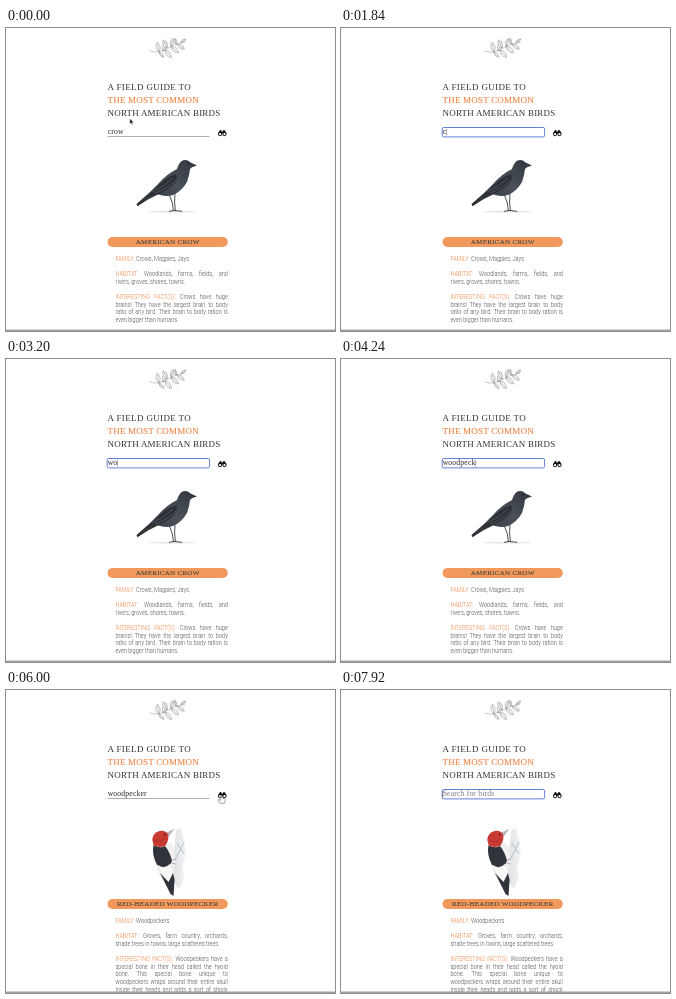
Recreate the animation shown at these times as an HTML page. Size 329 by 303 pixels, loop 8000 ms.

```html
<!DOCTYPE html>
<html lang="en">
<head>
<meta charset="utf-8">
<title>A field guide to birds</title>
<style>
  html, body { margin: 0; width: 100%; height: 100%; overflow: hidden; background: #fff; }
  svg { display: block; width: 100vw; height: 100vh; }
  .serif { font-family: "Liberation Serif", serif; fill: #333; }
  .head { font-size: 9px; }
  .hot { fill: #f08343; stroke: #f08343; stroke-width: .1; }
  .name { font-size: 7.1px; letter-spacing: .23px; text-anchor: middle; fill: #54463b; stroke: #54463b; stroke-width: .14; }
  .field { font-size: 7.6px; letter-spacing: .2px; }
  .body { font: 300 6.42px Roboto, sans-serif; fill: #4a4a4a; }
  .label { fill: #ef7f3d; }
</style>
</head>
<body>
<svg viewBox="0 0 329 303" preserveAspectRatio="none">
  <defs>
    <linearGradient id="coat" x1="0" y1="1" x2="1" y2="0">
      <stop offset="0" stop-color="#2a2d31"/>
      <stop offset=".55" stop-color="#4a515a"/>
      <stop offset="1" stop-color="#30353b"/>
    </linearGradient>
    <linearGradient id="bark" x1="0" x2="1">
      <stop offset="0" stop-color="#dfe1e5"/>
      <stop offset="1" stop-color="#f3f4f5"/>
    </linearGradient>
  </defs>
  <rect width="329" height="303" fill="#fff"/>

  <g id="sprig" fill="#fff" stroke="#808080" stroke-width=".45" stroke-linecap="round">
    <path d="M144 23Q152 26 160 21T179 14" fill="none"/>
  </g>

  <text class="serif head" x="101.5" y="62" letter-spacing=".36">A FIELD GUIDE TO</text>
  <text class="serif head hot" x="101.5" y="75" letter-spacing=".2">THE MOST COMMON</text>
  <text class="serif head" x="101.5" y="88" letter-spacing=".2">NORTH AMERICAN BIRDS</text>

  <path id="rule" d="M101.5 108.5H203.5" stroke="#8c8c8c" stroke-width=".7"/>
  <rect id="ring" x="101.2" y="99.5" width="102.4" height="9.4" rx="1.4" fill="#fff" stroke="#5b7bd5" stroke-width=".95"/>
  <text id="field" class="serif field" x="101.7" y="106.4"></text>
  <path id="caret" d="M0 101V107.6" stroke="#444" stroke-width=".45"/>

  <g fill="#111">
    <path d="M213.6 102.6Q214.6 101.4 215.6 102.6V103.4H217V102.6Q218 101.4 219 102.6L220.6 105.5H212Z"/>
    <circle cx="214.1" cy="106.1" r="2.1"/>
    <circle cx="218.5" cy="106.1" r="2.1"/>
    <circle cx="214.1" cy="106.2" r="1.1" fill="#fff"/>
    <circle cx="218.5" cy="106.2" r="1.1" fill="#fff"/>
  </g>

  <g id="crow">
    <ellipse cx="166" cy="183.8" rx="25" ry=".8" fill="#e2e2e2"/>
    <path d="M163 166L166.4 175L167.4 183M169 165L168.6 174L169.4 183M163 183.4L168 182.4L176 183.3" fill="none" stroke="#3b3d40" stroke-width=".9"/>
    <path d="M191 137.4L184.6 134.4Q180.5 130.8 176 132.8Q172.5 135.5 171 141Q160 146.5 153 155L143 165L130.5 176L131.5 178.3L142 171.5L152 166.5Q160 169 167 167Q176 163 181 154Q183.5 147 184 141L186 139.2Z" fill="url(#coat)"/>
    <path d="M170 146Q160 149 153 157L139 170Q156 166 166 158Q173 152 170 146Z" fill="#2c3035"/>
    <path d="M146 164Q158 159 167 150M149 165Q161 161 170 152" fill="none" stroke="#626c78" stroke-width=".6"/>
    <circle cx="182" cy="135.6" r=".6" fill="#0b0c0d"/>
  </g>

  <g id="pecker">
    <path d="M170 141Q173 136.5 175.5 139.5L178 150L180 163L176.5 177L178 188L173 199L168 192L167 175Z" fill="url(#bark)"/>
    <path d="M171 153L178 164M178 152L170 168" stroke="#b3bccb" stroke-width="1" fill="none"/>
    <path d="M157 153Q165 150 168 158Q170 168 167 184L163 194Q156 190 151 180Z" fill="#f1f0ee"/>
    <path d="M147.5 155Q154 159 159 156Q164 162 166 171Q164 176 159 179L151 175Q145.5 164 147.5 155Z" fill="#30333a"/>
    <path d="M152 175Q158 180 164 174Q168 181 166 191L162 194Q155 186 152 175Z" fill="#f8f8f6" stroke="#d2d3d4" stroke-width=".3"/>
    <path d="M154 183L162.5 192L167 183L168.6 190L167.5 206L164.5 204Z" fill="#303339"/>
    <path d="M160.5 142.6L168.5 138.8L163 146.2Z" fill="#b6babf"/>
    <path d="M146.3 150Q147 142.5 153.5 141Q160.5 140 162.5 145.5Q162.5 152 159 156Q152 158.5 147.6 155Z" fill="#c93a33"/>
    <path d="M149 151Q155 153 159.5 148" stroke="#a12a27" stroke-width=".8" fill="none"/>
    <circle cx="158.6" cy="144.6" r=".8" fill="#231516"/>
    <path d="M166 170L170 169M165.5 173L169.5 174" stroke="#777d84" stroke-width=".6"/>
  </g>

  <rect x="101.5" y="209" width="120.3" height="10" rx="5" fill="#f1995c"/>
  <text id="name" class="serif name" x="161.7" y="216.4"></text>
  <g id="crowText" class="body" transform="translate(109.5 0) scale(.87 1)"></g>
  <g id="peckerText" class="body" transform="translate(109.5 0) scale(.87 1)"></g>
  <path d="M0 302.2H329" stroke="#a2a2a2" stroke-width="1.6"/>

  <g id="mouse" stroke-linejoin="round">
    <path id="arrow" d="M0 0V5.6L1.4 4.4L2.2 6.4L3.1 6L2.3 4.1H4Z" fill="#111" stroke="#fff" stroke-width=".4"/>
    <path id="hand" d="M-.7 .6Q0 -.5 .7 .6V3L3.6 3.8Q4.5 4.2 4.2 5.6L3.4 8.2H-.8L-3 5.2Q-2.7 4 -1.6 4.8L-.7 5.4Z" fill="#fff" stroke="#333" stroke-width=".45"/>
    <path id="beam" d="M-1.3 -3.2Q0 -3.2 0 -2.4Q0 -3.2 1.3 -3.2M0 -2.4V2.4M-1.3 3.2Q0 3.2 0 2.4Q0 3.2 1.3 3.2" fill="none" stroke="#444" stroke-width=".45"/>
  </g>
</svg>
<script>
const LOOP = 8000;
const NS = "http://www.w3.org/2000/svg";
const $ = id => document.getElementById(id);
const show = (id, on) => $(id).setAttribute("visibility", on ? "visible" : "hidden");

function add(parent, tag, attrs, text = "") {
  const el = document.createElementNS(NS, tag);
  for (const k in attrs) el.setAttribute(k, attrs[k]);
  el.textContent = text;
  return parent.appendChild(el);
}

// Leaves: x, y, angle, length
[[153, 24, -100, 10], [157, 23, -70, 10], [161, 20, -115, 9], [165, 18, -75, 8],
 [170, 16, -100, 6], [175, 14.5, -35, 6], [153, 24.5, 45, 7], [159, 22, 50, 10],
 [165, 18.5, 40, 10], [171, 16, 35, 9]].forEach(([x, y, a, n]) =>
  add($("sprig"), "path", {
    d: `M0 0Q${n * .45} ${-n * .45} ${n} 0Q${n * .5} ${n * .4} 0 0H${n * .8}`,
    transform: `translate(${x} ${y}) rotate(${a})`
  }));

// A paragraph is [baseline, label, lines]; all lines but the last are justified.
const WIDTH = 112.3 / .87, LEADING = 7.65;
function write(id, paragraphs) {
  for (const [top, label, lines] of paragraphs) {
    lines.forEach((line, i) => {
      const el = add($(id), "text", { x: 0, y: top + i * LEADING });
      if (!i) add(el, "tspan", { class: "label" }, label);
      add(el, "tspan", {}, i ? line : " " + line);
      if (i === lines.length - 1) return;
      const gaps = el.textContent.split(" ").length - 1;
      el.style.wordSpacing = (WIDTH - el.getComputedTextLength()) / gaps + "px";
    });
  }
}

write("crowText", [
  [233.3, "FAMILY:", ["Crows, Magpies, Jays"]],
  [248.5, "HABITAT:", ["Woodlands, farms, fields, and", "rivers, groves, shores, towns."]],
  [271.2, "INTERESTING FACT(S):", ["Crows have huge",
    "brains! They have the largest brain to body",
    "ratio of any bird. Their brain to body ration is",
    "even bigger than humans."]]
]);
write("peckerText", [
  [233.3, "FAMILY:", ["Woodpeckers"]],
  [248.5, "HABITAT:", ["Groves, farm country, orchards,", "shade trees in towns, large scattered trees."]],
  [271.2, "INTERESTING FACT(S):", ["Woodpeckers have a",
    "special bone in their head called the hyoid",
    "bone. This special bone unique to",
    "woodpeckers wraps around their entire skull",
    "inside their heads and adds a sort of shock", ""]]
]);

const WORD = "woodpecker";
const SUBMIT = 5600;

function typed(t) {
  if (t < 2000) return "crow".slice(0, t < 1120 ? 4 : t < 1360 ? 3 : t < 1600 ? 2 : 1);
  if (t < 2560 || t >= 7600) return "";
  if (t < 2960) return "w";
  return WORD.slice(0, t < 3300 ? 2 : 3 + Math.floor((t - 3300) / 165));
}

const PATH = [
  [0, 123.8, 90.4], [80, 123.8, 90.4], [260, 130, 103], [400, 130, 103], [800, 128, 62],
  [4640, 128, 62], [5200, 215, 105], [6020, 215, 105],
  [6560, 144.4, 104], [7120, 144.4, 104], [7520, 83, 31], [LOOP, 83, 31]
];

function pointer(t) {
  const i = PATH.findIndex(p => p[0] > t);
  const [t0, x0, y0] = PATH[i - 1], [t1, x1, y1] = PATH[i];
  const u = (t - t0) / (t1 - t0), e = u * u * (3 - 2 * u);
  return [x0 + (x1 - x0) * e, y0 + (y1 - y0) * e];
}

function draw(t) {
  const focus = t >= 320 && t < SUBMIT || t >= 6900;
  const found = t >= SUBMIT;
  const text = typed(t);
  const field = $("field");

  show("ring", focus);
  show("rule", !focus);
  field.textContent = text || "Search for birds";
  field.style.fill = text ? "#2b2b2b" : "#7a7a7a";
  const end = text ? field.getComputedTextLength() : 0;
  $("caret").setAttribute("transform", `translate(${101.8 + end} 0)`);
  show("caret", focus);

  show("crow", !found);
  show("crowText", !found);
  show("pecker", found);
  show("peckerText", found);
  $("name").textContent = found ? "RED-HEADED WOODPECKER" : "AMERICAN CROW";

  const [x, y] = pointer(t);
  const seen = t < 960 || t >= 4640 && t < 7600;
  const inRow = y > 99 && y < 109;
  const kind = inRow && x > 211 ? "hand" : inRow && x < 204 ? "beam" : "arrow";
  $("mouse").setAttribute("transform", `translate(${x} ${y})`);
  for (const k of ["arrow", "hand", "beam"]) show(k, seen && k === kind);
}

const start = performance.now();
function tick() {
  draw((performance.now() - start) % LOOP);
  requestAnimationFrame(tick);
}
tick();
</script>
</body>
</html>
```
